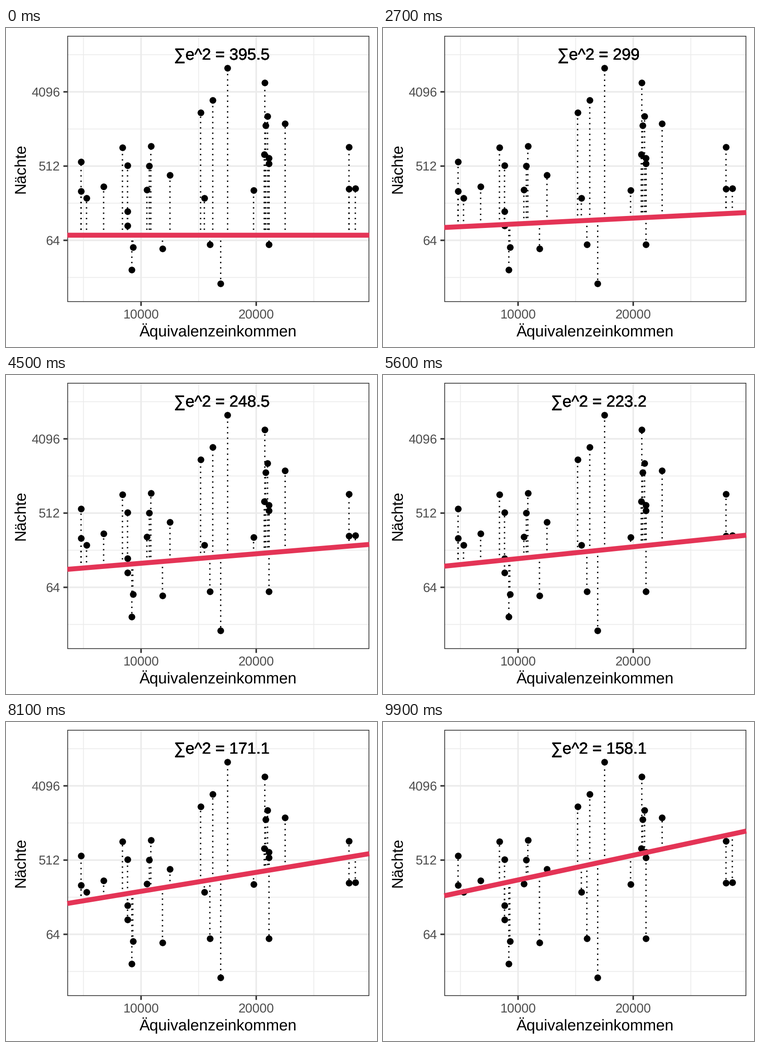
Recreate the animation shown at these times as a matplotlib script. Size 806 by 694 pixels, loop 10000 ms.

```python
import numpy as np
import matplotlib.pyplot as plt
from matplotlib.animation import FuncAnimation
from matplotlib.collections import LineCollection
from matplotlib.patches import Rectangle

W, H, DPI = 806, 694, 100
PX = 72 / DPI  # points per pixel
LEFT, RIGHT, TOP, BOTTOM = 133.2, 789.3, 17, 596.1
MID_X, MID_Y = (LEFT + RIGHT) / 2, (TOP + BOTTOM) / 2
GRID, DARK, GREY, RED = "#ebebeb", "#333333", "#4d4d4d", "#e43456"
STROKE = 3.3  # major grid line, minor lines are half of it
FRAMES = 100

plt.rcParams.update({
    "font.family": "Liberation Sans",
    "text.hinting": "none",
    "text.hinting_factor": 1,
})

# Nights observed at each income
NIGHTS = {
    4790: [581, 255], 5265: [208], 6750: [290], 8385: [856],
    8825: [518, 144, 96], 9200: [28], 9285: [53], 10505: [263],
    10715: [515], 10850: [895], 11860: [51], 12510: [398],
    15170: [2292], 15495: [210], 15975: [57], 16225: [3224],
    16915: [19], 17515: [8000], 19770: [261], 20695: [710],
    20745: [5293], 20820: [1592], 20985: [2072], 21110: [641, 549, 57],
    22510: [1682], 28055: [872, 271], 28605: [274],
}


def sx(income):
    return 293.4 + 250.2 * (income / 1e4 - 1)


def sy(nights):
    """Log scale: one major step is a factor of eight."""
    return 461.9 - 161.5 * np.log(nights / 64) / np.log(8)


fig = plt.figure(figsize=(W / DPI, H / DPI), dpi=DPI, facecolor="white")
ax = fig.add_axes([0, 0, 1, 1])
ax.set_xlim(0, W)
ax.set_ylim(H, 0)
ax.axis("off")


def line(xs, ys, color, width, z):
    return ax.plot(xs, ys, color=color, lw=width * PX, zorder=z,
                   solid_capstyle="butt", snap=False)[0]


def label(x, y, text, size, color="black", ha="center", **kw):
    return ax.text(x, y, text, fontsize=size * PX, color=color, ha=ha,
                   va="baseline", zorder=8, **kw)


# Grid: half steps are minor, whole steps carry a tick and a number
for k in range(1, 6):
    x, major = sx(5000 * k), k % 2 == 0
    line([x, x], [TOP, BOTTOM], GRID, STROKE * (1 + major) / 2, 1 + major)
    if major:
        line([x, x], [BOTTOM, BOTTOM + 8.5], DARK, STROKE, 2)
        label(x, 631.5, str(5000 * k), 27.5, GREY)
for k in range(-1, 6):
    nights, major = 64 * 8 ** (k / 2), k % 2 == 0
    y = sy(nights)
    line([LEFT, RIGHT], [y, y], GRID, STROKE * (1 + major) / 2, 1 + major)
    if major:
        line([LEFT - 8.5, LEFT], [y, y], DARK, STROKE, 2)
        label(117.7, y + 9.7, f"{nights:.0f}", 27.6, GREY, ha="right")

inset = STROKE / 4
ax.add_patch(Rectangle((LEFT + inset, TOP + inset),
                       RIGHT - LEFT - 2 * inset, BOTTOM - TOP - 2 * inset,
                       fill=False, ec=DARK, lw=2 * inset * PX, zorder=3,
                       snap=False))
label(MID_X, 670.5, "Äquivalenzeinkommen", 34.4)
label(41.3, MID_Y, "Nächte", 34.4, rotation=90, rotation_mode="anchor")

px, py = np.array([(sx(i), sy(n)) for i, ns in NIGHTS.items() for n in ns]).T
ax.plot(px, py, "o", color="black", ms=14.5 * PX, mew=0, zorder=5, snap=False)

residuals = LineCollection([], colors="black", linewidths=2.9 * PX,
                           linestyles=[(0, (1, 3))], capstyle="butt", zorder=4)
residuals.set_snap(False)
ax.add_collection(residuals, autolim=False)
fit = line([], [], RED, 10.8, 6)

# Stacked copies harden the glyph edges
titles = [label(468.6, 69, "", 35.4) for _ in range(10)]


def progress(i):
    """Steady growth that becomes half as fast again after step 63."""
    return (i + 0.5 * max(i - 63, 0)) / 117


def update(i):
    p = progress(i)
    y0, y1 = 450.8 - 72.8 * p, 450.8 - 213.6 * p
    fit.set_data([LEFT, RIGHT], [y0, y1])
    base = y0 + (y1 - y0) * (px - LEFT) / (RIGHT - LEFT)
    residuals.set_segments([[(x, b), (x, y)] for x, b, y in zip(px, base, py)])
    error = 158.095 + 237.405 * (1 - p * 214 / 215) ** 2
    for t in titles:
        t.set_text(f"∑e^2 = {round(error, 1):g}")
    return [fit, residuals, *titles]


anim = FuncAnimation(fig, update, frames=FRAMES, interval=100,
                     repeat=True, repeat_delay=0, blit=False)
plt.show()
```
